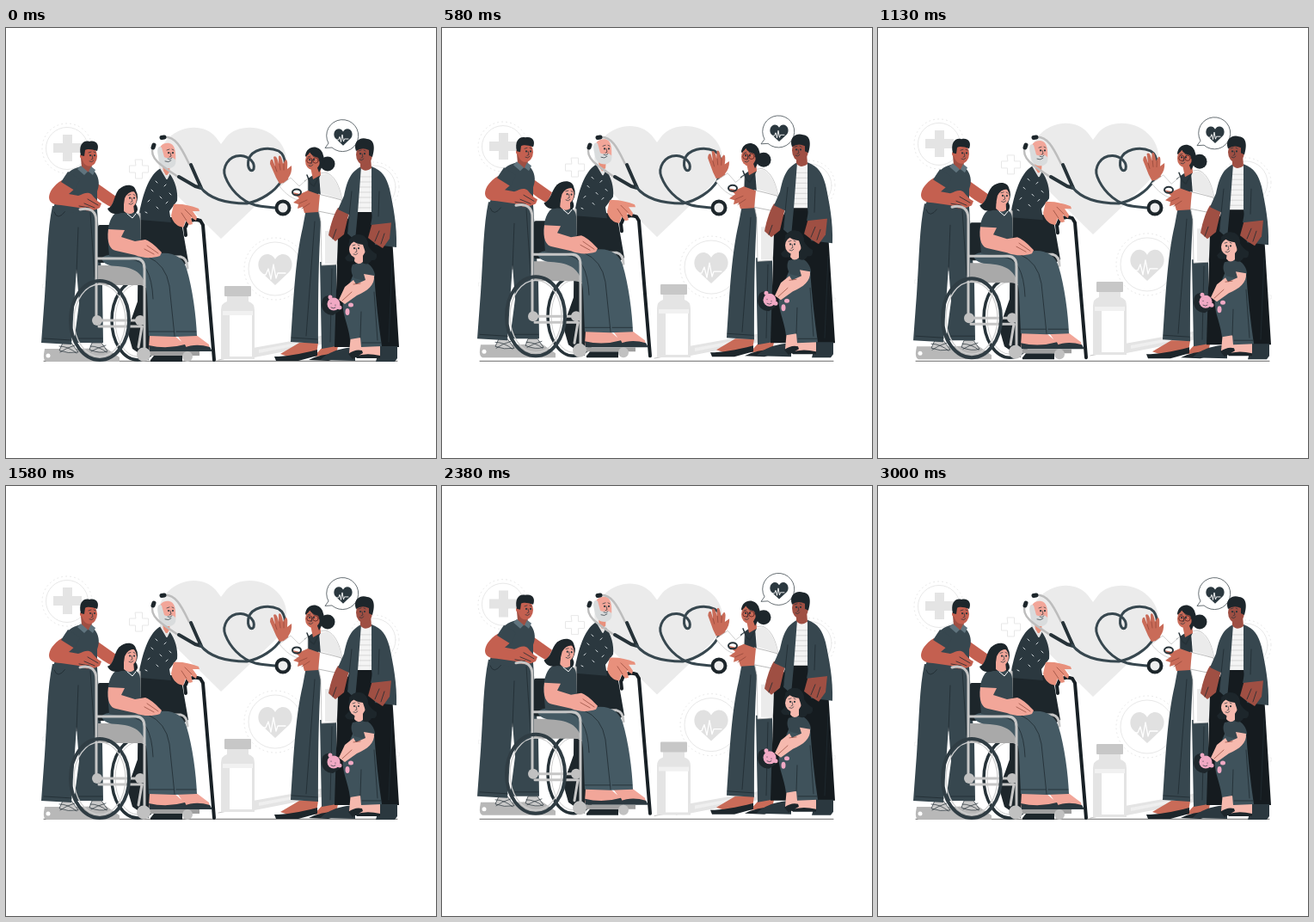
Recreate the animation shown at these times as an HTML page. Size 500x500 px, loop 3040 ms.

```html
<!DOCTYPE html>
<html lang="en">
<head>
<meta charset="utf-8">
<title>Family care</title>
<style>
html,body{margin:0;width:100%;height:100%;overflow:hidden;background:#fff}
svg{display:block;width:100vw;height:100vh}
.line{fill:none;stroke-linecap:round;stroke-linejoin:round}
.black{fill:#151b1f}.ink{fill:#1d262b}.dark{fill:#2b383f}.slate{fill:#37474f}.denim{fill:#455a64}
.brown{fill:#c46050}.deep{fill:#9f4f43}.tan{fill:#c96b58}.peach{fill:#e8907c}.rose{fill:#f2a699}.blush{fill:#f6b9ae}
.thin{stroke:#263238;stroke-width:.7}
.seam{stroke:#202b31;stroke-width:.8}
.crease{stroke:#8f4538;stroke-width:.7}
.chrome{stroke:#c6c6c6;stroke-width:3}
.pale{stroke:#e8e8e8;stroke-width:1}
.white{fill:#fff}
</style>
</head>
<body>
<svg viewBox="0 0 500 500">
<defs>
  <path id="heart" d="M0 18L-16 3C-21-2-21-11-15-16C-10-20-3-18 0-12C3-18 10-20 15-16C21-11 21-2 16 3Z"/>
  <path id="pulse" class="line" d="M-11 4H-7L-4-3L-1 9L2-8L5 8L7 2H16"/>
  <path id="cross" d="M-4-11H4V-4H11V4H4V11H-4V4H-11V-4H-4Z"/>
  <g id="face" class="line thin"><path d="M0 3Q3 5 5 2M3-4L4 0L2 1M-1-7L2-8M5-8L7-7"/><path stroke-width="2" d="M1-4V-3.8M6-4V-3.8"/></g>
</defs>

<g id="back">
  <path fill="#ebebeb" d="M250 245L192 188C174 170 172 144 189 128C206 112 231 112 244 127L250 135L256 127C269 112 298 112 314 128C331 144 330 168 312 186Z"/>
  <g class="line pale">
    <circle cx="71" cy="140" r="24.5"/><circle cx="71" cy="140" r="29" stroke-dasharray="1 4"/>
    <circle cx="313" cy="280" r="31"/><circle cx="313" cy="280" r="36" stroke-dasharray="1 4"/>
    <circle cx="428" cy="185" r="25"/><circle cx="428" cy="185" r="29" stroke-dasharray="1 4"/>
    <use href="#cross" x="154.500" y="164"/><use href="#cross" transform="translate(48 300)scale(.5)"/>
    <use href="#cross" transform="translate(452 318)scale(.5)"/>
  </g>
  <path fill="#e4e4e4" d="M66 124H77V134H88V145H77V155H66V145H55V134H66Z"/>
  <use href="#heart" x="313" y="281" fill="#e1e1e1"/>
  <use href="#pulse" x="309" y="283" stroke="#fff" stroke-width="1.300"/>
  <path fill="#e4e4e4" d="M287 372L371 357V367L289 383Z"/>
  <path fill="#efefef" d="M294 374L365 361V364L294 378Z"/>
  <path fill="#c4c4c4" d="M271 377L286 373L288 382L272 385Z"/>
  <path class="line" stroke="#c4c4c4" d="M247 386L272 381"/>
  <path fill="#e4e4e4" d="M257 311H282V318Q289 320 289 328V385H250V328Q250 320 257 318Z"/>
  <rect x="254" y="300" width="31" height="12" rx="1" fill="#c7c7c7"/>
  <path fill="#f1f1f1" d="M252 329H287V334H252Z"/><path class="white" d="M260 334H286V382H260Z"/>
</g>

<path class="line" stroke="#444" stroke-width=".8" d="M44 387.300H455"/>

<g class="people">
  <!-- carer -->
  <path fill="#b8b8b8" d="M45 373H84L116 372L132 383V388H47Q43 386 44 379Z"/>
  <circle class="white" cx="49" cy="381" r="2.500"/>
  <g fill="#c9c9c9" class="thin"><path d="M66 366H76L84 377Q72 379 62 375Z"/><path d="M100 366H111L118 376Q109 379 97 374Z"/></g>
  <path class="line thin" stroke-width="1.300" d="M62 370Q72 370 82 378M63 377Q70 372 80 369M98 370Q108 370 117 377M99 376Q106 372 116 369"/>
  <path class="slate" d="M54 207C48 235 48 270 45 312L41 366L76 368L82 280L85 320L79 366L113 366L112 300L106 211Z"/>
  <path class="line seam" d="M84 232L82 285M44 361L76 363M82 361H112M56 214Q60 225 69 213M98 215L103 290"/>
  <path class="brown" d="M104 179L128 196L122 208C112 203 106 198 101 193Z"/>
  <path class="slate" d="M87 161C76 164 70 168 66 178L62 190L55 209C70 216 95 217 106 213V190C110 180 107 172 103 167L98 161Z"/>
  <path class="brown" d="M65 177C55 183 50 191 50 197C50 203 56 206 64 206L85 209C92 213 100 214 109 209L111 204C106 202 103 197 99 193C94 190 90 193 84 195L73 193L81 186Z"/>
  <path class="slate" d="M72 167L64 179L80 189L86 176Z"/>
  <path class="line seam" d="M85 207L97 209M91 204L103 209M95 199L107 206"/>
  <path class="deep" d="M87 151H101L99 166Q94 170 88 162Z"/>
  <path fill="#60747e" d="M87 160L95 167L91 171L83 164ZM99 161L96 167L101 171L104 165Z"/>
  <ellipse class="brown" cx="97" cy="149" rx="9" ry="11.500"/><circle class="brown" cx="89" cy="149" r="3"/>
  <path class="ink" d="M87 148C84 136 90 130 97 132C105 130 109 136 106 143C100 141 95 140 92 142L91 149Z"/>
  <use href="#face" x="97" y="152"/>

  <!-- older man -->
  <path class="ink" d="M154 220H203L212 272L170 300L166 386L147 373L141 352L153 318Z"/>
  <path class="ink" d="M168 386L172 381H205V388H168Z"/>
  <path class="peach" d="M181 155H191L190 170L184 172Z"/>
  <path class="dark" d="M180 163C167 170 160 190 155 215V223L192 226L190 213L199 201C200 190 197 178 190 169L187 174Z"/>
  <path class="line" stroke="#e4e4e4" stroke-width="2" d="M180 163L187 175L190 169"/>
  <path class="line" stroke="#dce2e5" d="M174 178l2 2M184 184l2-2M169 188l2 2M179 196l2 2M190 192l2 2M165 202l2-2M175 208l2 2M186 204l2-2M162 214l2 1"/>
  <path class="line" stroke="#182025" stroke-width="4" d="M209 231L211 226Q217 221 226 224L229 229L242 386M208 232L209 241"/>
  <path class="peach" d="M195 205C203 204 214 206 224 210L225 213L217 213L222 220L221 224L215 220L217 228L213 229L209 224L206 232L203 231C198 230 193 224 192 218Z"/>
  <path class="line crease" d="M208 211L216 219M204 215L210 224"/>
  <path class="rose" d="M178 149C176 136 184 133 190 134C196 135 198 143 197 156H180Z"/>
  <path fill="#d9dcdd" d="M177 149C175 141 177 136 181 139L184 150C188 153 193 148 197 153C199 160 193 164 187 163C180 162 178 156 177 149Z"/>
  <path class="line thin" d="M185 155Q189 157 192 154"/><use href="#face" x="188" y="149"/>

  <!-- wheelchair, far side -->
  <ellipse class="line" cx="153" cy="340" rx="30" ry="46" stroke="#263238" stroke-width="3.500"/>
  <ellipse class="line" cx="153" cy="340" rx="26" ry="42" stroke="#cfcfcf"/>
  <path class="line chrome" d="M181 266H203Q211 268 211 279M155 216V245"/>
  <rect class="ink" x="107" y="229" width="17" height="44" rx="2"/>
  <path fill="#a9a9a9" d="M107 276H161V299H107Z"/>

  <!-- seated girl -->
  <path class="rose" d="M167 357H195L209 369L207 373H166ZM198 356H220L236 368L237 373H210Z"/>
  <path class="dark" d="M166 369Q187 374 208 368L212 376H167ZM207 372Q220 366 237 371L240 376H207Z"/>
  <path class="denim" d="M111 268C117 260 148 263 165 266C187 257 205 263 210 280C217 303 221 335 222 358L196 359L166 358L164 310C162 287 153 279 130 277Q114 277 111 268Z"/>
  <path class="line seam" d="M165 266Q186 275 190 300L196 358M166 353H195M198 353H221M145 269Q169 270 171 315"/>
  <path class="slate" d="M131 213C121 217 119 230 118 240L120 265Q140 270 157 264L156 224C156 217 151 214 147 213Z"/>
  <path class="rose" d="M119 234C117 250 121 258 128 259L150 264C160 268 170 268 179 265L181 261C176 256 170 249 162 246L150 248L134 243L138 235Z"/>
  <path class="line crease" d="M161 257L172 263M164 253L177 262"/>
  <g id="tilt">
    <path class="ink" d="M131 188C138 181 149 181 151 189Q155 196 151 205Q155 211 151 215L134 215C126 218 120 215 118 210C126 207 125 195 131 188Z"/>
    <path class="rose" d="M137 204H148L149 214Q143 219 137 213Z"/><ellipse class="rose" cx="143.500" cy="198.500" rx="8.500" ry="10.500"/>
    <path class="ink" d="M131 188Q143 179 151 190Q142 189 138 198L136 212Q130 216 124 212Z"/>
    <use href="#face" x="143" y="201.500"/>
  </g>
  <path class="line" stroke="#fff" d="M141 216L147 221L151 216"/>

  <!-- wheelchair, near side -->
  <path class="line chrome" d="M86 211C98 208 105 213 105 225V338M106 268H151Q161 268 161 280V374M108 340H158M108 347H158L154 371"/>
  <path fill="#9f9f9f" d="M160 376H225V381H160Z"/>
  <g fill="#c1c1c1"><circle cx="106" cy="340" r="6"/><circle cx="156" cy="340" r="6"/><circle cx="160" cy="379.500" r="8"/><circle cx="211" cy="382" r="6"/></g>
  <g class="line"><ellipse cx="109" cy="340" rx="34" ry="46" stroke="#303d44" stroke-width="4"/><ellipse cx="109" cy="340" rx="30" ry="42" stroke="#cfcfcf" stroke-width="1.300"/></g>
</g>

<!-- stethoscope stays in place -->
<g class="line">
  <path stroke="#bdbdbd" stroke-width="2.500" d="M183 127C198 125 205 142 213 158M171 138C166 151 180 160 200 173"/>
  <path stroke="#1d262b" stroke-width="5" d="M181 127.500L184 127M172 136L171 139"/>
  <path stroke="#263238" stroke-width="4" d="M201 173L220 184L227 186L222 175L215 159"/>
  <path stroke="#37474f" stroke-width="3" d="M226 185C236 198 255 204 280 204C296 201 313 190 320 178C326 166 327 149 317 143C304 137 286 141 282 153C280 163 285 169 288 164C290 157 283 149 273 148.500C258 148 251 163 255 173C260 186 272 201 290 206C298 208 306 208 313 209"/>
  <circle cx="322" cy="209" r="7.500" stroke="#1d262b" stroke-width="4" style="fill:#eee"/>
</g>

<g class="people">
  <!-- doctor -->
  <path class="tan" d="M319 379L341 366H363L361 379L331 383ZM358 382L369 370H386L384 380Z"/>
  <path class="ink" d="M312 382Q331 382 362 374V381L340 387H314ZM352 386Q365 379 387 378V383L375 387Z"/>
  <path class="slate" d="M365 272H384L384 370L367 373ZM350 205H368C363 255 363 320 363 367L331 365C334 322 336 270 345 232Z"/>
  <path class="line seam" d="M332 360L362 362M359 225L349 358M379 280L377 365"/>
  <path fill="#fff" stroke="#bdbdbd" stroke-width=".8" d="M351 176Q360 169 372 168C383 172 389 185 392 207L390 240L384 275L367 276L366 225L360 196Z"/>
  <path fill="#ebebeb" d="M365 171L373 169Q386 176 391 200L379 196L366 192ZM371 236H386L384 274H371Z"/>
  <path class="dark" d="M347 178L357 171L364 170L367 209Q358 214 347 208Z"/>
  <g id="wave">
    <path class="tan" d="M318 181L314 174L307 158Q307 152 310 153L313 161L311 150Q315 147 317 158L317 149Q320 146 322 158L325 153Q328 152 327 164L332 160Q333 168 328 175L330 179Z"/>
    <path class="line crease" d="M313 161L315 167M318 158L319 165M323 158V165"/>
    <path fill="#fff" stroke="#bdbdbd" stroke-width=".7" d="M318 184L331 174L341 184L351 175V191L343 200C335 201 324 192 318 184Z"/>
  </g>
  <path class="line" stroke="#263238" stroke-width="1.500" d="M350 171L354 181L358 184L365 171"/>
  <path fill="#fff" stroke="#aaa" stroke-width=".8" d="M363 193L379 197L390 200Q394 214 383 217L363 213Z"/>
  <path class="tan" d="M365 194L351 189L342 193L333 191L341 198L334 203L340 205L339 210L345 208L347 215L363 214Z"/>
  <path class="line crease" d="M341 204L350 200M344 210L353 204"/>
  <ellipse class="line" cx="338" cy="191" rx="5" ry="3.500" stroke="#263238" stroke-width="2"/>
  <path class="tan" d="M353 157H365L366 171L357 176Z"/>
  <circle class="ink" cx="374" cy="158" r="8.500"/>
  <path class="ink" d="M348 149C349 137 363 135 368 145L371 155L364 168L361 160Z"/>
  <ellipse class="tan" cx="356.500" cy="154.500" rx="8.500" ry="10.500"/>
  <path class="ink" d="M348 149Q353 136 365 142L369 152L366 160L363 151Q355 149 353 144Q352 148 348 149Z"/>
  <g class="line" stroke="#702f2a"><circle cx="353" cy="154" r="3.200"/><circle cx="360" cy="154" r="3.200"/></g>
  <use href="#face" x="352" y="157"/>

  <!-- speech bubble -->
  <path class="white thin" d="M375 134L371 139.500L379 139A18.500 18.500 0 1 0 375 134Z"/>
  <use href="#heart" class="dark" transform="translate(392 127)scale(.54)"/>
  <use href="#pulse" stroke="#fff" stroke-width="1.800" transform="translate(390 128)scale(.5)"/>

  <!-- father -->
  <path class="black" d="M404 211H447L457 371H382L386 240Z"/>
  <path class="dark" d="M366 386C370 380 385 372 406 371V387ZM435 370H455V384L452 388H430Z"/>
  <path class="deep" d="M386 209C380 218 376 235 375 241L383 248L393 240L399 214Z"/>
  <path fill="#f4f4f4" d="M411 163L426 161L426 214H407Z"/>
  <path class="line" stroke="#cfcfcf" stroke-width=".8" d="M410 173H427M410 179H427M410 185H427M409 191H426M409 197H426M408 203H426M408 209H426"/>
  <path class="slate" d="M413 161C400 168 397 177 393 195L386 211L399 217L397 239L406 247L409 215ZM425 161C438 166 442 173 446 187C450 206 455 230 454 255L429 252L425 213Z"/>
  <path class="deep" d="M426 226H448L446 245L438 256L430 251L421 244Z"/>
  <path class="slate" d="M432 185L447 194L451 226L424 229Z"/>
  <path class="line seam" d="M402 190L397 237M434 190L433 219M449 270L445 365M380 245L384 234M429 248L434 236M436 251L440 239"/>
  <path class="deep" d="M412 150H424L425 163Q417 169 412 162Z"/>
  <ellipse class="deep" cx="416.500" cy="147" rx="9.500" ry="12.500"/>
  <path class="ink" d="M407 143C403 132 412 126 420 129C429 130 429 140 426 150L422 148V142Q414 138 407 143Z"/>
  <use href="#face" x="411" y="150"/>

  <!-- little girl -->
  <path class="blush" d="M401 356H413L414 373L407 383L399 378ZM416 366H435V382H411L409 379Z"/>
  <path class="ink" d="M398 379Q406 373 414 375L415 378L403 385ZM406 382Q418 377 435 381V384H408Z"/>
  <path fill="#3f525b" d="M404 286H428Q431 330 437 370L413 371L412 360L400 362C398 343 388 328 393 313Z"/>
  <path class="line seam" d="M413 330L412 360M414 366H436M428 307L432 363"/>
  <path class="slate" d="M403 275C400 281 402 287 405 291L417 294L429 289C429 281 424 275 417 272Z"/>
  <path class="blush" d="M416 286L428 288C429 299 420 306 408 311L394 321L387 316L394 301L404 293L407 298L418 293Z"/>
  <path class="line crease" d="M402 307L391 317M404 298L412 297"/>
  <path class="ink" d="M399 246Q406 238 415 241Q421 245 421 253Q424 259 431 263Q432 271 425 270Q421 277 414 273L403 271Q396 273 394 267L400 261Z"/>
  <path class="blush" d="M406 263H415V272Q409 277 405 271Z"/><ellipse class="blush" cx="408.500" cy="257.500" rx="9.500" ry="10"/>
  <path class="ink" d="M398 254Q399 241 409 240Q421 241 421 253L418 261L415 252Q406 251 403 247Q402 251 398 254Z"/>
  <use href="#face" x="404" y="260"/>
  <path class="ink" d="M377 311Q367 310 367 322Q368 333 380 334L388 329L386 316Z"/>
  <g fill="#f1a9c4"><circle cx="381" cy="321" r="7.500"/><circle cx="377" cy="313" r="2.500"/><circle cx="388" cy="325" r="2.500"/><ellipse cx="401" cy="322" rx="3" ry="2.500"/><ellipse cx="397" cy="330" rx="2.500" ry="4"/></g>
  <path class="line thin" d="M378 320v.5M383 322v.5M378 325Q381 327 383 325"/>
</g>
</svg>
<script>
const LOOP = 3040;
const back = document.querySelector('#back');
const people = document.querySelectorAll('.people');
const tilt = document.querySelector('#tilt');
const wave = document.querySelector('#wave');
const start = performance.now();

// 0 at the low point of the swing, 1 at the high point
const rise = (time, period) => (1 - Math.cos(2 * Math.PI * time / period)) / 2;
const set = (el, value) => el.setAttribute('transform', value);

function draw(now) {
  const time = Math.max(0, now - start) % LOOP;
  const bob = rise(time, LOOP / 2);
  set(back, `translate(0 ${-6 * rise(time, LOOP)})`);
  people.forEach(el => set(el, `translate(0 ${-5.4 * bob})`));
  set(tilt, `rotate(${6 * bob} 142 215)`);
  set(wave, `rotate(${4 * bob} 340 192)`);
  requestAnimationFrame(draw);
}
draw(start);
</script>
</body>
</html>
```
